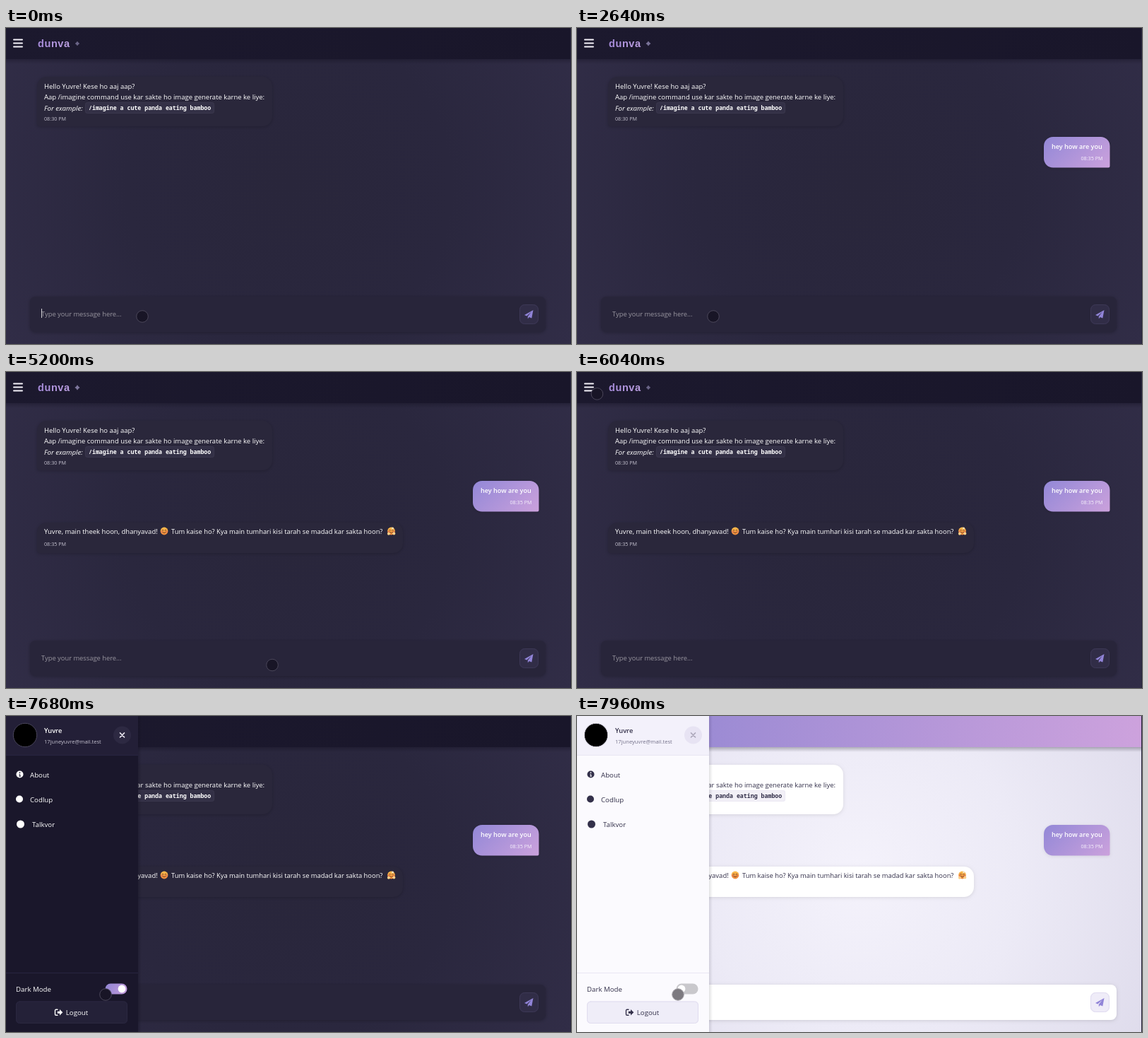
Write an HTML page with a canvas that moves like this. It is 800 px wide and 447 px high and loops after 8000 ms.

```html
<!DOCTYPE html>
<html lang="en">
<head>
<meta charset="utf-8">
<title>Chat demo</title>
<style>
  html, body { margin: 0; width: 100%; height: 100%; overflow: hidden; background: #26243a; }
  canvas { display: block; width: 800px; height: 447px; }
</style>
</head>
<body>
<canvas id="stage"></canvas>
<script>
const W = 800, H = 447, LOOP = 8000;
const SANS = '"Open Sans", "Noto Sans", sans-serif';
const MONO = '"Noto Sans Mono", "DejaVu Sans Mono", monospace';
const MESSAGE = 'hey how are you';
const KEY_START = 820, KEY_STEP = 91, SENT = 2340, THINKING = 2960, REPLIED = 4600;
const SIDEBAR_OPEN = 6681, SIDEBAR_WIDTH = 187, THEME_SWITCH = 7720;

// Pointer stops: time, x, y
const POINTER = [
  [0, 193, 408], [3220, 193, 408], [3380, 183, 390], [4700, 183, 390],
  [5000, 376, 414], [5400, 378, 415], [5880, 34, 40], [6200, 23, 22],
  [6900, 23, 22], [7500, 140, 394], [7680, 141, 394], [7960, 143, 394]
];

const canvas = document.getElementById('stage');
const ctx = canvas.getContext('2d');
const ratio = window.devicePixelRatio || 1;
canvas.width = W * ratio;
canvas.height = H * ratio;

let light = 0; // 0 dark theme, 1 light theme

const clamp = v => Math.max(0, Math.min(1, v));
const lerp = (a, b, p) => a + (b - a) * p;
const smooth = p => p * p * (3 - 2 * p);
const easeOut = p => 1 - (1 - p) ** 3;
const progress = (t, start, length) => clamp((t - start) / length);

function tone(dark, bright) {
  const part = (hex, i) => parseInt(hex.slice(1 + i * 2, 3 + i * 2), 16);
  return `rgb(${[0, 1, 2].map(i => Math.round(lerp(part(dark, i), part(bright, i), light)))})`;
}

function withStops(gradient, colors) {
  colors.forEach((c, i) => gradient.addColorStop(i / (colors.length - 1), c));
  return gradient;
}
const linear = (x0, y0, x1, y1, ...colors) => withStops(ctx.createLinearGradient(x0, y0, x1, y1), colors);

function text(str, x, y, { size = 9.5, color = '#fff', weight = 400, style = 'normal', family = SANS, align = 'left' } = {}) {
  ctx.font = `${style} ${weight} ${size}px ${family}`;
  ctx.fillStyle = color;
  ctx.textAlign = align;
  ctx.fillText(str, x, y);
}

function box(x, y, w, h, radius, fill, { border, shadow } = {}) {
  ctx.save();
  ctx.beginPath();
  ctx.roundRect(x, y, w, h, radius);
  if (shadow) {
    ctx.shadowColor = `rgba(0,0,0,${shadow * (1 - light * .45)})`;
    ctx.shadowBlur = 5 * ratio;
    ctx.shadowOffsetY = 1 * ratio;
  }
  ctx.fillStyle = fill;
  ctx.fill();
  ctx.restore();
  if (border) {
    ctx.beginPath();
    ctx.roundRect(x + .5, y + .5, w - 1, h - 1, radius);
    ctx.strokeStyle = border;
    ctx.lineWidth = 1;
    ctx.stroke();
  }
}

function circle(x, y, r, fill, stroke) {
  ctx.beginPath();
  ctx.arc(x, y, r, 0, Math.PI * 2);
  ctx.fillStyle = fill;
  ctx.fill();
  if (stroke) {
    ctx.strokeStyle = stroke;
    ctx.lineWidth = 1;
    ctx.stroke();
  }
}

function lines(path, color, width) {
  ctx.strokeStyle = color;
  ctx.lineWidth = width;
  ctx.lineCap = ctx.lineJoin = 'round';
  ctx.stroke(new Path2D(path));
}

function shape(path, color) {
  ctx.fillStyle = color;
  ctx.fill(new Path2D(path));
}

function faded(alpha, dy, draw) {
  ctx.save();
  ctx.globalAlpha = alpha;
  ctx.translate(0, dy);
  draw();
  ctx.restore();
}

const ink = () => tone('#ffffff', '#33304a');
const faint = () => tone('#c4c1cf', '#74718a');
const botBubble = (x, y, w, h) => box(x, y, w, h, [14, 14, 14, 3], tone('#2a273b', '#ffffff'), { shadow: .2 });

function drawBackground() {
  ctx.fillStyle = withStops(ctx.createRadialGradient(400, 225, 0, 400, 225, 460), [
    tone('#29263b', '#f4f2fb'), tone('#2a273e', '#eceaf6'), tone('#312d47', '#dfdcec')
  ]);
  ctx.fillRect(0, 0, W - 1, H);
}

function drawHeader(t) {
  ctx.fillStyle = linear(0, 44, 0, 51, 'rgba(10,8,22,.28)', 'rgba(10,8,22,0)');
  ctx.fillRect(0, 44, W - 1, 7);
  ctx.fillStyle = linear(0, 0, W, 44, tone('#1c192e', '#8d84d1'), tone('#19162a', '#cda2dd'));
  ctx.fillRect(0, 0, W - 1, 44);
  for (const y of [15.5, 20.5, 25.5]) box(10, y, 14, 2, 1, '#f3f1f8');
  ctx.letterSpacing = '0.6px';
  text('dunva', 45, 27, { size: 14.5, weight: 700, family: '"Liberation Sans", Arial, sans-serif',
    color: linear(45, 0, 91, 0, '#a58ad9', '#bb9fe0') });
  ctx.letterSpacing = '0px';
  const pulse = .5 - .5 * Math.cos(t / 1000 * Math.PI);
  ctx.save();
  ctx.translate(101, 22);
  ctx.scale(1 + pulse * .15, 1 + pulse * .15);
  ctx.globalAlpha = .7 + pulse * .2;
  shape('M0 -3.2 L1.4 -1.4 L3.2 0 L1.4 1.4 L0 3.2 L-1.4 1.4 L-3.2 0 L-1.4 -1.4Z', '#8b84ac');
  ctx.restore();
}

function drawGreeting() {
  botBubble(44, 69, 333, 70);
  const color = ink();
  text('Hello Yuvre! Kese ho aaj aap?', 54, 86, { color });
  text('Aap /imagine command use kar sakte ho image generate karne ke liye:', 54, 101, { color });
  text('For example:', 54, 116.5, { color, size: 9.7, style: 'italic' });
  box(112, 105, 183, 16, 3, tone('#333046', '#f2f0f7'), { border: tone('#3a374d', '#ebe8f3') });
  text('/imagine a cute panda eating bamboo', 117, 116, { color, size: 8.26, weight: 600, family: MONO });
  text('08:30 PM', 54, 130.8, { color: faint(), size: 7.2 });
}

function drawSentMessage() {
  box(661, 154, 93.5, 43.5, [13, 13, 2, 13], linear(675, 142, 741, 210, '#9388d7', '#cba1dc'), { shadow: .15 });
  text(MESSAGE, 672, 171, { size: 9.1, weight: 600 });
  text('08:35 PM', 744.5, 187.3, { size: 7.2, color: '#f6f0fb', align: 'right' });
}

function drawTyping() {
  botBubble(44, 213, 55, 25);
  text('Typing...', 55, 229, { style: 'italic', color: '#a5a2b2' });
}

function drawFace(x, y, hugging) {
  circle(x, y, 5.4, linear(x, y - 5, x, y + 5, '#f9bb4b', '#ee8a3c'));
  lines(`M${x - 3} ${y - 1} q1 -1.4 2 0 M${x + 1} ${y - 1} q1 -1.4 2 0 M${x - 2.5} ${y + 1.5} q2.5 2.6 5 0`, '#6a3724', .9);
  circle(x - 3.6, y + 1, 1, '#ef7055');
  circle(x + 3.6, y + 1, 1, '#ef7055');
  if (hugging) {
    circle(x - 3.6, y + 3.8, 2, '#f9d08a');
    circle(x + 3.8, y + 3.4, 2, '#f9d08a');
    circle(x + 2, y - 4, 1.5, '#f7dfb6');
  }
}

function drawReply() {
  botBubble(44, 213, 518, 43);
  const color = ink();
  text('Yuvre, main theek hoon, dhanyavad!', 54, 228.8, { color });
  drawFace(224, 225);
  text('Tum kaise ho? Kya main tumhari kisi tarah se madad kar sakta hoon?', 234, 228.8, { color, size: 9.35 });
  drawFace(545.5, 225, true);
  text('08:35 PM', 54, 246.3, { color: faint(), size: 7.2 });
}

function drawInput(t) {
  box(34, 380, 730, 50, 8, tone('#28253a', '#ffffff'), { shadow: .25 });
  const typed = t < KEY_START || t >= SENT ? '' :
    MESSAGE.slice(0, 1 + Math.floor((t - KEY_START) / KEY_STEP));
  text(typed || 'Type your message here...', 50, 407.6, { size: 9.35, color: typed ? ink() : tone('#98959f', '#96939f') });
  const lastKey = KEY_START + KEY_STEP * (MESSAGE.length - 1);
  const sinceKey = t < KEY_START ? t : Math.max(0, t - lastKey);
  if (sinceKey % 1060 < 530) {
    ctx.fillStyle = ink();
    ctx.fillRect(50 + (typed ? ctx.measureText(typed).width : 0), 397, .8, 13);
  }
  box(727, 391, 27, 28, 7, tone('#312d47', '#efecf8'), { border: tone('#3d3856', '#dfdaf0') });
  shape('M746.5 399 L734 405.9 L737.4 407.4 L743.8 401.6 L738.8 408 L738.8 411.2 L740.8 408.9 L744.3 410.4Z', '#9184d8');
}

function drawSidebar(t) {
  const width = SIDEBAR_WIDTH * easeOut(progress(t, SIDEBAR_OPEN, 300));
  if (width <= 0) return;
  const color = ink();
  ctx.fillStyle = linear(width, 0, width + 5, 0, `rgba(10,8,22,${lerp(.25, .12, light)})`, 'rgba(10,8,22,0)');
  ctx.fillRect(width, 0, 5, H);
  ctx.save();
  ctx.beginPath();
  ctx.rect(0, 0, width, H);
  ctx.clip();
  ctx.fillStyle = tone('#1a172b', '#fbfafe');
  ctx.fillRect(0, 0, width, H);
  ctx.fillStyle = tone('#231f37', '#f3f1fb');
  ctx.fillRect(0, 0, width, 55);
  ctx.fillStyle = tone('#282540', '#e9e6f3');
  ctx.fillRect(0, 55, width, 1);
  ctx.fillRect(0, 363, width, 1);

  circle(27, 27, 16.7, '#000', tone('#4a465c', '#dcd9e8'));
  text('Yuvre', 54, 24, { color, size: 9.3, weight: 600 });
  text('17juneyuvre@mail.test', 54, 38.8, { color: faint(), size: 7.6 });
  circle(164.5, 27, 12.5, tone('#2d2942', '#e7e3f3'));
  lines('M161.5 24 l6 6 m0 -6 l-6 6', tone('#f0eef6', '#aaa6b8'), 1.7);

  circle(19.5, 82.5, 5, color);
  const cutout = tone('#1a172b', '#fbfafe');
  circle(19.5, 80.2, .9, cutout);
  lines('M19 82.5 h.7 v2.5 m-1 0 h2', cutout, 1);
  circle(19, 117.5, 5, color);
  circle(20.5, 153, 5.5, color);
  text('About', 34, 86.8, { color, size: 9.7 });
  text('Codlup', 34, 121.6, { color, size: 9.7 });
  text('Talkvor', 37, 156.8, { color, size: 9.7 });

  text('Dark Mode', 14, 390.2, { color, size: 9.7 });
  const left = width - 46.5;
  box(left, 378.5, 31, 15, 7.5, linear(left, 378, left + 31, 394, tone('#9085d5', '#c9c8cc'), tone('#c59cdb', '#c9c8cc')));
  circle(width - 23 - 16 * light, 386, 5.4, '#fff');

  box(14, 403.5, Math.max(0, width - 29), 31.5, 5, tone('#242138', '#efedf8'), { border: tone('#2a2740', '#e0dcef') });
  const middle = (width - 1) / 2;
  ctx.save();
  ctx.translate(middle - 24, 419.3);
  lines('M4 -4 h-2.2 q-1.3 0 -1.3 1.3 v5.4 q0 1.3 1.3 1.3 h2.2', color, 1.4);
  shape('M3.8 -1.5 h3.2 v-2.8 l4.3 4.3 l-4.3 4.3 v-2.8 h-3.2Z', color);
  ctx.restore();
  text('Logout', middle - 8.2, 423, { color, size: 9.7 });
  ctx.restore();
}

function drawPointer(t) {
  const next = POINTER.findIndex(stop => stop[0] > t);
  let [, x, y] = POINTER[POINTER.length - 1];
  if (next > 0) {
    const [t0, x0, y0] = POINTER[next - 1], [t1, x1, y1] = POINTER[next];
    const p = smooth((t - t0) / (t1 - t0));
    x = lerp(x0, x1, p);
    y = lerp(y0, y1, p);
  }
  circle(x, y, 8.3, tone('#181526', '#7d7a80'), tone('#4b475a', '#a9a6ad'));
}

function render(t) {
  light = progress(t, THEME_SWITCH, 200);
  ctx.setTransform(ratio, 0, 0, ratio, 0, 0);
  ctx.fillStyle = '#26243a';
  ctx.fillRect(0, 0, W, H);
  drawBackground();
  drawHeader(t);
  drawGreeting();
  if (t >= SENT) {
    const p = easeOut(progress(t, SENT, 300));
    faded(p, 8 * (1 - p), drawSentMessage);
  }
  if (t >= THINKING && t < REPLIED) {
    faded(.6 - .22 * Math.cos((t - 3760) / 1500 * Math.PI * 2), 0, drawTyping);
  }
  if (t >= REPLIED) {
    const p = easeOut(progress(t, REPLIED, 300));
    faded(p, 8 * (1 - p), drawReply);
  }
  drawInput(t);
  drawSidebar(t);
  drawPointer(t);
}

function tick() {
  render(performance.now() % LOOP);
  requestAnimationFrame(tick);
}
tick();
</script>
</body>
</html>
```
